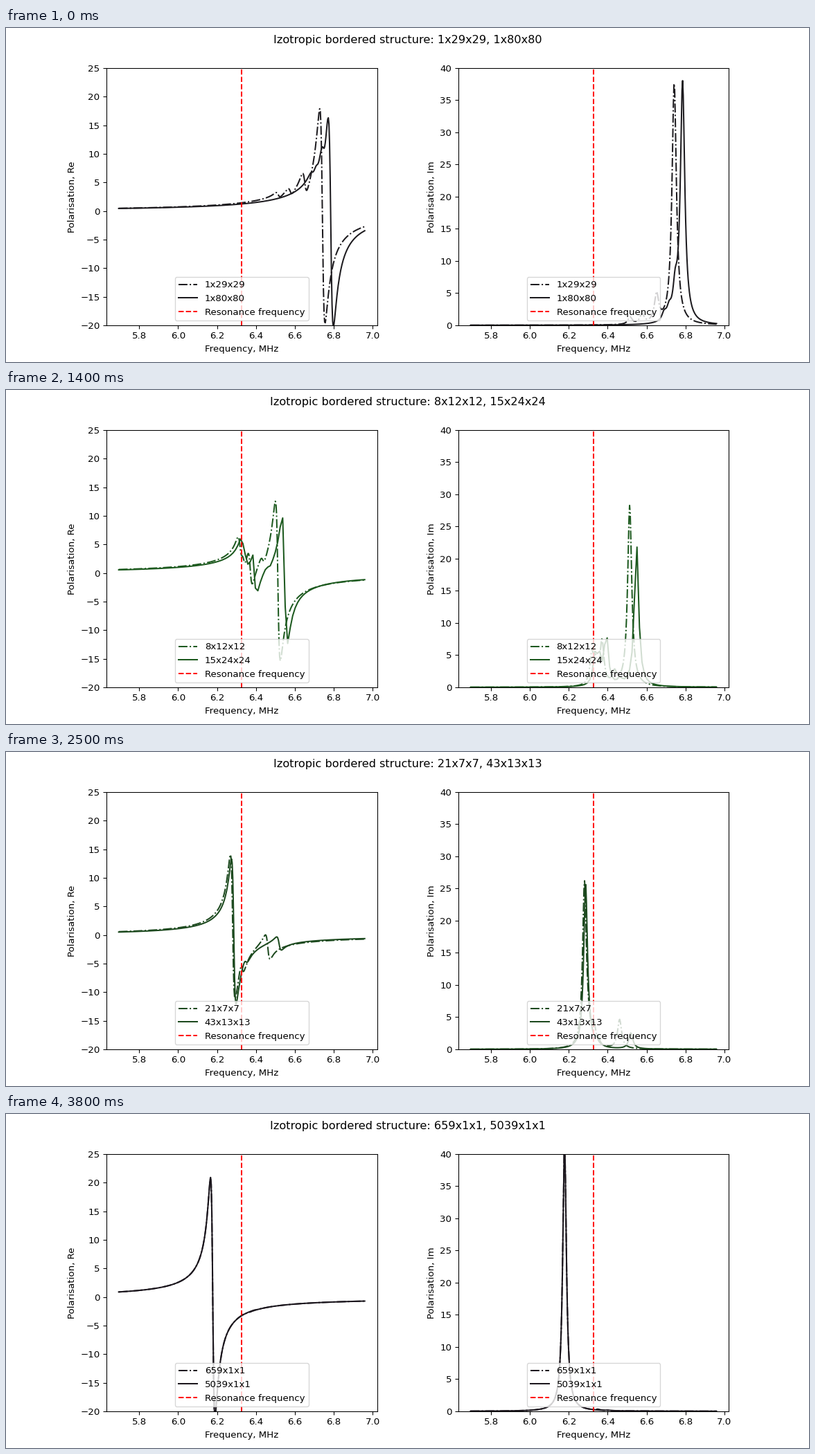
Write a matplotlib script that moves like this. It is 1159 px wide and 483 px high and loops after 3900 ms.

```python
import numpy as np
import matplotlib.pyplot as plt
from matplotlib.animation import FuncAnimation

FRAMES = 39
F0 = 6.327          # resonance of a single element, MHz
LOSS = 0.0238
KEYS = [0, 5, 9, 14, 21, 29, 38]    # frames of the key points below


def fall(frame, middle, width):
    """Smooth step from 1 down to 0."""
    return 1 / (1 + np.exp((frame - middle) / width))


class Lattice:
    """A block of elements that turns from a thin plate into a long chain."""

    def __init__(self, layers, side, upper, lower, swap):
        self.layers, self.side = layers, side
        self.upper, self.lower = upper, lower   # mode branches, MHz above 6
        self.swap = swap                        # frame where the plate mode fades

    def label(self, frame):
        n, m = (round(np.exp(np.interp(frame, KEYS, np.log(size))))
                for size in (self.layers, self.side))
        return f"{n}x{m}x{m}"

    def modes(self, frame):
        """Mode frequencies between the two branches and their peak heights."""
        low = np.interp(frame, KEYS, self.lower)
        high = np.interp(frame, KEYS, self.upper)
        plate = fall(frame, self.swap, 3.6)
        chain = 1 - fall(frame, 23.6, 4)
        mix = np.exp(-((frame - self.swap) / 7) ** 2)
        freqs = 6 + low + (high - low) * np.array([0, 0.1, 0.27, 0.6, 1])
        peaks = np.array([1 + 42 * chain, 4 * mix, 1.5 * plate + 7.5 * mix,
                          4.5 * plate**3, 38 * plate])
        return freqs, peaks

    def polarisation(self, f, frame):
        """Sum of lossy resonances, each peaking at its height in the imaginary part."""
        fm, peaks = self.modes(frame)
        f = f[:, None]
        gamma = LOSS * (fm / F0) ** 2
        return (peaks * gamma * f**2 / fm / (fm**2 - f**2 - 1j * gamma * f)).sum(axis=1)


small = Lattice(layers=[1, 3, 5, 8, 12, 38, 659],
                side=[29, 18, 15, 12, 9, 5, 1],
                upper=[.742, .6365, .569, .513, .488, .434, .35],
                lower=[.515, .285, .31, .318, .314, .247, .178],
                swap=17.8)
large = Lattice(layers=[1, 6, 10, 15, 24, 78, 5039],
                side=[80, 37, 29, 24, 18, 10, 1],
                upper=[.785, .657, .5855, .548, .538, .5, .4],
                lower=[.69, .36, .345, .335, .318, .2545, .178],
                swap=15.4)
lattices = [small, large]


def line_color(frame):
    """Greener while the block is close to a cube."""
    green = 20 + 78 * np.exp(-((frame - 18) / 8) ** 2 / 2)
    return 28 / 255, green / 255, 30 / 255


def sweep(points):
    return np.linspace(0.9 * F0, 1.1 * F0, points)


def make_panel(ax, ylabel, ylim):
    lines = [ax.plot([], [], style, label="-")[0] for style in ("-.", "-")]
    ax.axvline(F0, color="red", ls="--", label="Resonance frequency")
    ax.set_xlim(0.89 * F0, 1.11 * F0)
    ax.set_ylim(*ylim)
    ax.set_xlabel("Frequency, MHz")
    ax.set_ylabel(ylabel)
    return lines, ax.legend(loc="lower center")


# 1159 x 483 pixels
fig, axes = plt.subplots(1, 2, figsize=(12, 5.001), dpi=96.6)
fig.subplots_adjust(left=0.125, right=0.9, bottom=0.11, top=0.88, wspace=0.3)
title = fig.suptitle("")
panels = [make_panel(axes[0], "Polarisation, Re", (-20, 25)),
          make_panel(axes[1], "Polarisation, Im", (0, 40))]


def update(frame):
    color = line_color(frame)
    labels = [lattice.label(frame) for lattice in lattices]
    title.set_text("Izotropic bordered structure: " + ", ".join(labels))

    # The large lattice is swept coarsely except for extreme shapes
    freqs = [sweep(400), sweep(100 if 1 <= frame <= 24 else 400)]
    curves = [lattice.polarisation(f, frame) for lattice, f in zip(lattices, freqs)]

    for (lines, legend), part in zip(panels, (np.real, np.imag)):
        handles, texts = legend.get_lines(), legend.get_texts()
        for i, line in enumerate(lines):
            line.set_data(freqs[i], part(curves[i]))
            line.set_color(color)
            handles[i].set_color(color)
            texts[i].set_text(labels[i])
    return []


anim = FuncAnimation(fig, update, frames=FRAMES, interval=100,
                     repeat=True, repeat_delay=0)
plt.show()
```
